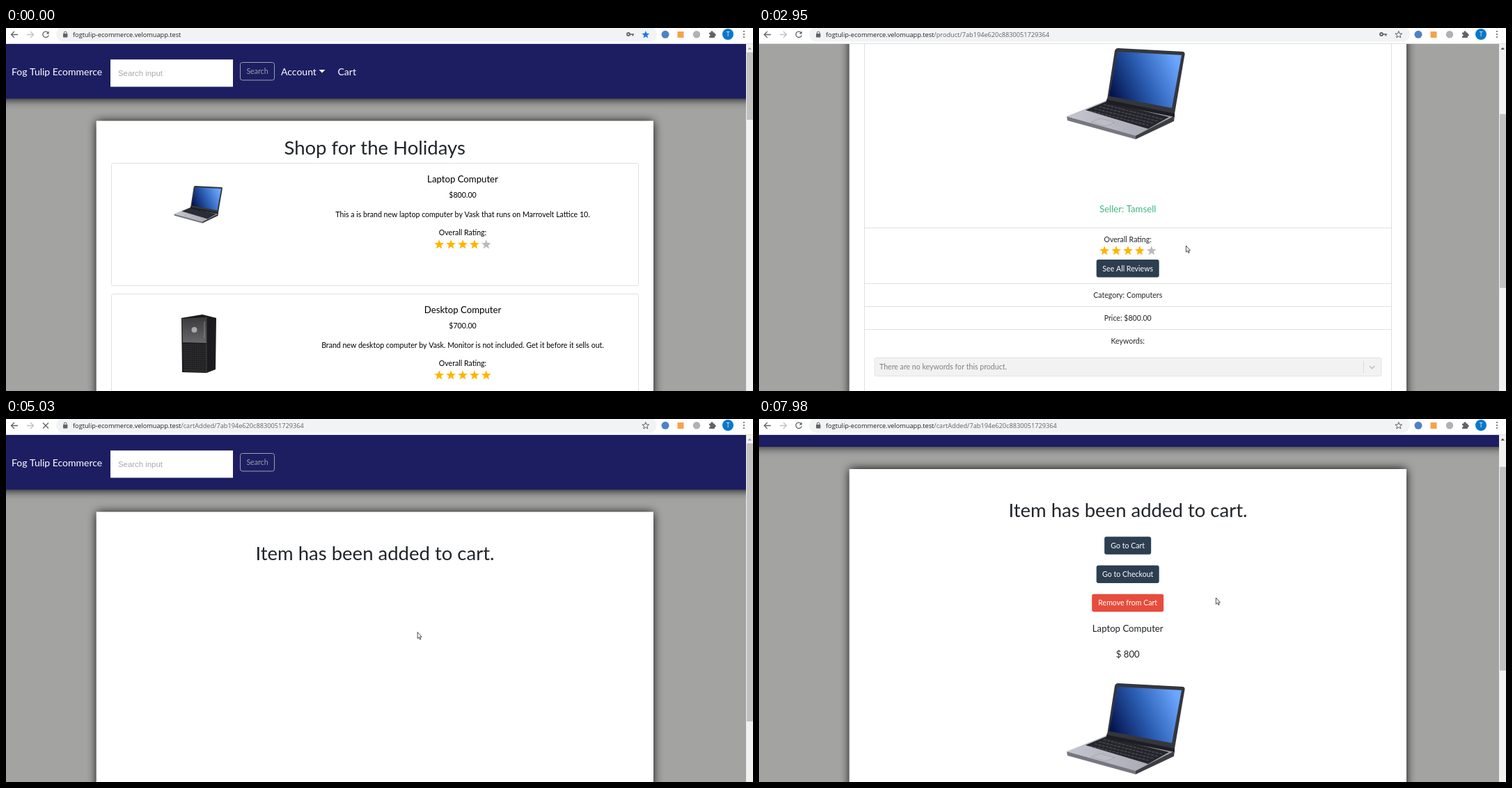
An HTML page with a canvas that plays this animation: 1073 by 522 pixels, repeating every 8 s.

```html
<!DOCTYPE html>
<html lang="en">
<head>
<meta charset="utf-8">
<title>Shop walkthrough</title>
<style>
  html, body { margin: 0; width: 100%; height: 100%; overflow: hidden; background: #fff; }
  canvas { display: block; }
</style>
</head>
<body>
<canvas id="stage" width="1073" height="522"></canvas>
<script>
const ctx = document.getElementById('stage').getContext('2d');
const LOOP = 8000, STEP = 73;
const OPEN_PRODUCT = 1690, OPEN_CART = 4480, CART_READY = 5480, LOADED = 6360;
const LATO = 'Lato, sans-serif', SANS = '"Liberation Sans", Arial, sans-serif';
const UI = '"Open Sans", sans-serif', MONO = '"Liberation Mono", monospace';
const INK = '#212529', NAVY = '#2c3e50', LINE = '#dfdfdf', HOVER = '#0f7864';
const MID = 529.7, HEADING = 27.5;
const LAPTOP_TEXT = 'This a is brand new laptop computer by Vask that runs on Marrovelt Lattice 10.';
const TOWER_TEXT = 'Brand new desktop computer by Vask. Monitor is not included. Get it before it sells out.';
const ITEM_ID = '7ab194e620c8830051729364';

const CURSOR = [
  [0, 1046, 520], [70, 1042, 496], [290, 1008, 361], [697, 1008, 361], [1170, 598, 311],
  [1539, 598, 311], [1540, 590, 316], [1690, 590, 316], [2100, 594, 319.5], [2657, 594, 319.5],
  [2950, 613, 313], [3497, 613, 313], [3890, 603, 359], [4350, 536, 366], [4550, 536, 366],
  [5190, 616, 279], [5250, 622, 272], [5887, 622, 272], [6110, 656, 257]
];
const SCROLL = [
  [0, 0], [2657, 0], [2950, 190], [3170, 310], [3420, 349], [3497, 349], [3890, 418.3],
  [4479, 418.3], [OPEN_CART, 0], [7137, 0], [7440, 105.5], [7600, 140], [7757, 140], [7980, 61.5]
];

function track(keys, t) {
  const next = keys.findIndex(k => k[0] > t);
  if (next < 0) return keys[keys.length - 1].slice(1);
  const [a, ...from] = keys[next - 1], [b, ...to] = keys[next];
  const p = Math.floor((t - a) / STEP) * STEP / (b - a);
  return from.map((v, i) => v + (to[i] - v) * p);
}

function text(str, x, y, size, color = INK, align = 'center', family = LATO) {
  ctx.font = `${size}px ${family}`;
  ctx.textAlign = align;
  ctx.fillStyle = color;
  ctx.fillText(str, x, y + size * 0.36);
  return ctx.measureText(str).width;
}

function rect(x, y, w, h, color) {
  ctx.fillStyle = color;
  ctx.fillRect(x, y, w, h);
}

function box(x, y, w, h, fill, stroke, radius = 3) {
  ctx.beginPath();
  ctx.roundRect(x, y, w, h, radius);
  if (fill) { ctx.fillStyle = fill; ctx.fill(); }
  if (stroke) { ctx.strokeStyle = stroke; ctx.lineWidth = 1; ctx.stroke(); }
}

function shape(d, fill, stroke, width = 1) {
  const path = new Path2D(d);
  if (fill) { ctx.fillStyle = fill; ctx.fill(path); }
  if (stroke) { ctx.strokeStyle = stroke; ctx.lineWidth = width; ctx.stroke(path); }
}

function gradient(x0, y0, x1, y1, ...colors) {
  const g = ctx.createLinearGradient(x0, y0, x1, y1);
  colors.forEach((c, i) => g.addColorStop(i / (colors.length - 1), c));
  return g;
}

function disc(x, y, r, color) {
  ctx.beginPath();
  ctx.arc(x, y, r, 0, Math.PI * 2);
  ctx.fillStyle = color;
  ctx.fill();
}

function shadowed(x, y, w, h, color) {
  ctx.save();
  ctx.shadowColor = '#000';
  ctx.shadowBlur = 13;
  rect(x, y, w, h, color);
  ctx.restore();
}

function at(x, y, scale, draw) {
  ctx.save();
  ctx.translate(x, y);
  ctx.scale(scale, scale);
  draw();
  ctx.restore();
}

function star(x, y, r, fill, stroke) {
  ctx.beginPath();
  for (let i = 0; i < 10; i++) {
    const a = i * Math.PI / 5 - Math.PI / 2, d = i % 2 ? r * 0.42 : r;
    ctx.lineTo(x + d * Math.cos(a), y + d * Math.sin(a));
  }
  ctx.closePath();
  if (fill) { ctx.fillStyle = fill; ctx.fill(); }
  if (stroke) { ctx.strokeStyle = stroke; ctx.lineWidth = 1; ctx.stroke(); }
}

function rating(x, y, count) {
  for (let i = 0; i < 5; i++) star(x + (i - 2) * 16.9, y + 0.5, 7.3, i < count ? '#ffb400' : '#bbb');
}

function button(label, y, w, color = NAVY) {
  box(MID - w / 2, y, w, 25.5, color);
  text(label, MID, y + 12.7, 10.6, '#fff');
}

function laptop(x, y, scale = 1) {
  at(x, y, scale, () => {
    shape('M1 98L100 125V131L2 104Z', '#77777f');
    shape('M100 125L156 97L155 105L100 131Z', '#3d3d44');
    shape('M1 98L58 75L156 97L100 126Z', gradient(0, 100, 150, 100, '#c6c6d0', '#a3a3ad'));
    shape('M28 89L57 77L148 99L118 116Z', '#25262c');
    ctx.setLineDash([4, 1.5]);
    for (let i = 0; i < 4; i++) {
      const dx = i * 6.5, dy = i * 3;
      shape(`M${54 - dx} ${81 + dy}L${138 - dx} ${102 + dy}`, null, '#4d4e57', 1.2);
    }
    ctx.setLineDash([]);
    shape('M36 106L50 101L70 107L57 112Z', '#bdbdc6', '#9a9aa3', 0.6);
    shape('M59 72L156 91L156 99L57 79Z', '#1d1e23');
    shape('M75 0L168 5Q172 6 170 12L156 94L59 74L70 4Q71 0 75 0Z', '#35363c');
    shape('M74 5L166 10L152 86L62 69Z', gradient(64, 64, 160, 20, '#04134c', '#2b5fb4', '#6ca6ff'));
  });
}

function tower(x, y) {
  at(x, y, 1, () => {
    shape('M0 5L30 0L50 5L49 79L36 84L1 83Z', '#1b1b1d');
    shape('M1 6L36 4V41L2 40Z', gradient(0, 5, 0, 42, '#3b3b3e', '#69696c'));
    shape('M2 42L36 43V83L3 82Z', '#2a2a2c');
    ctx.setLineDash([1.5, 1.5]);
    for (let i = 0; i < 12; i++) shape(`M3 ${44.5 + i * 3}L36 ${45.5 + i * 3}`, null, '#111', 1);
    ctx.setLineDash([]);
    shape('M36 3V84', null, '#4a4a4d', 0.8);
    shape('M33 10V34', null, '#99999c', 0.8);
    disc(18.5, 22, 4, '#a9a9ac');
  });
}

function productCard(y, title, price, description, stars, hovered) {
  box(151.5, y + 0.5, 757, 176, '#fff', LINE);
  const color = hovered ? HOVER : '#000';
  const lines = [[title, 23, 13.2], [price, 46.5, 10.6], [description, 74, 10.6], ['Overall Rating:', 100.5, 10.6]];
  for (const [str, dy, size] of lines) {
    const w = text(str, 656, y + dy, size, color);
    if (hovered) rect(656 - w / 2, y + dy + size * 0.36 + 1.2, w, 0.8, color);
  }
  rating(656, y + 117, stars);
}

function homePage(hovered) {
  text('Shop for the Holidays', MID, 172, HEADING);
  productCard(194, 'Laptop Computer', '$800.00', LAPTOP_TEXT, 4, hovered);
  laptop(241, 227, 0.41);
  productCard(382, 'Desktop Computer', '$700.00', TOWER_TEXT, 5, false);
  tower(252, 412);
}

function productPage(hovered) {
  box(151.5, 154.5, 757, 697, '#fff', LINE);
  text('Laptop Computer', MID, 187, HEADING);
  laptop(441, 219);
  text('Seller: Tamsell', MID, 450, 13.2, '#3fb57c');
  text('Overall Rating:', MID, 494, 10.6);
  rating(530, 510, 4);
  button('See All Reviews', 523, 90);
  text('Category: Computers', MID, 574, 10.6);
  text('Price: $800.00', MID, 607, 10.6);
  text('Keywords:', MID, 640, 10.6);
  for (const y of [477, 557, 590, 623, 714]) rect(152, y, 757, 1, LINE);
  box(166, 664, 728, 26.5, '#f2f2f2', '#e4e4e4');
  text('There are no keywords for this product.', 173, 677.5, 10.6, '#808080', 'left');
  rect(868, 669, 0.8, 17, '#d5d5d5');
  shape('M877 676L880.7 679.7L884.4 676', null, '#bdbdbd', 1.5);
  text(LAPTOP_TEXT, 527, 736, 8.4, INK, 'center', MONO);
  button('Add to Cart', 770.3, 71.5, hovered ? '#1e2b37' : NAVY);
  button('Add to Wishlist', 812, 89.5);
  button('Go Back', 883.3, 57);
}

function cartPage(ready) {
  text('Item has been added to cart.', 530, 193, HEADING);
  if (!ready) return;
  button('Go to Cart', 230.7, 67);
  button('Go to Checkout', 272, 90);
  button('Remove from Cart', 313.2, 103, '#e74c3c');
  text('Laptop Computer', MID, 362.5, 13.2);
  text('$ 800', MID, 399.5, 13.2);
  laptop(441, 441.5);
}

function navbar(showMenu) {
  shadowed(-20, 0, 1100, 101.5, '#1d1d62');
  text('Fog Tulip Ecommerce', 8, 62.5, 14, '#fff', 'left');
  rect(150, 45.3, 176, 39.2, '#fff');
  text('Search input', 161, 65, 11.4, '#a9a9a9', 'left', SANS);
  box(336.5, 49.5, 49, 25.5, null, '#95a5a6');
  text('Search', 361, 62.3, 10.6, '#95a5a6');
  if (!showMenu) return;
  text('Account', 395, 62.5, 14, '#fff', 'left');
  shape('M449.5 60H458.5L454 64.5Z', '#fff');
  text('Cart', 476.5, 62.5, 14, '#fff', 'left');
}

function scrollbar(top, height) {
  rect(1063, 23, 10, 499, '#f1f1f1');
  shape('M1065.5 31H1071L1068.2 27.8Z', top > 0 ? '#505050' : '#a3a3a3');
  rect(1064, 35 + top, 9, height, '#c1c1c1');
}

function browserBar(path, saved, hasKey, loading) {
  const grey = '#5f6368';
  rect(0, 0, 1073, 23, '#fff');
  rect(0, 22, 1073, 1, '#dcdfe2');
  box(72, -1, 863, 20.5, '#f1f3f4', null, 10);
  shape('M17 9.5H7.5M12 5L7.5 9.5L12 14', null, grey, 1.3);
  shape('M30 9.5H39.5M35 5L39.5 9.5L35 14', null, '#bdc1c6', 1.3);
  if (loading) {
    shape('M53 5.5L61 13.5M61 5.5L53 13.5', null, grey, 1.3);
  } else {
    shape('M60.3 6.5A4.2 4.2 0 1 0 61.2 10.3', null, grey, 1.3);
    shape('M61.7 4.5V8.6H57.6Z', grey);
  }
  box(82, 8, 6.4, 5.5, grey, null, 0.8);
  shape('M83.3 8.2V7A1.9 1.9 0 0 1 87.1 7V8.2', null, grey, 1);
  const w = text('fogtulip-ecommerce.velomuapp.test', 96, 9.3, 9.2, '#202124', 'left', UI);
  text(path, 96 + w, 9.3, 9.2, grey, 'left', UI);
  if (hasKey) {
    disc(894, 9, 2.9, grey);
    disc(894, 9, 1.1, '#f1f3f4');
    shape('M896 9H902M900.3 9V11.5', null, grey, 1.7);
  }
  star(918.8, 9.7, saved ? 5.8 : 5.2, saved && '#1a73e8', !saved && grey);
  disc(947, 9.3, 5.5, '#4c83c3');
  box(964.5, 5, 9, 9, '#f6a24b', null, 0);
  disc(992, 9.3, 5.2, '#aeb1b5');
  box(1010, 6.5, 8, 7.5, grey, null, 1);
  disc(1014, 6, 1.8, grey);
  disc(1018, 10, 1.8, grey);
  disc(1010.2, 10.4, 1.3, '#fff');
  disc(1037, 9, 8, '#0b78c8');
  text('T', 1037, 9, 8.5, '#fff', 'center', UI);
  for (const y of [5, 9, 13]) disc(1060, y, 1.1, grey);
}

function pointer(x, y, hand) {
  at(x, y, 1, () => hand
    ? shape('M-1 .5Q0-.5 1 .5V4.5L4.5 5.5Q5 6 5 7V9L4 11.5H-1.5L-4 7.5Q-4 6-2.5 6.5L-1 8Z', '#fff', '#222', 0.8)
    : shape('M.4 0V9.2L2.4 7.4L3.8 10.6L5.2 10L3.8 6.9H6.4Z', '#fff', '#222', 0.8));
}

function draw(t) {
  const page = t < OPEN_PRODUCT ? 'home' : t < OPEN_CART ? 'product' : 'cart';
  const ready = t >= CART_READY;
  const [scroll] = track(SCROLL, t), [x, y] = track(CURSOR, t);
  const hand = page === 'home' ? x < 909 : page === 'product' && t > 3900 && x < 565;

  ctx.save();
  ctx.beginPath();
  ctx.rect(0, 23, 1073, 499);
  ctx.clip();
  rect(0, 0, 1073, 522, '#a3a3a2');
  ctx.translate(0, -scroll);
  shadowed(129.7, 133.5, 800.3, 1000, '#fff');
  navbar(page !== 'cart' || ready);
  if (page === 'home') homePage(hand);
  else if (page === 'product') productPage(hand);
  else cartPage(ready);
  ctx.restore();

  if (page === 'home') scrollbar(0, 97);
  else if (page === 'product') scrollbar(scroll * 0.467, 250);
  else scrollbar(scroll * 0.55, ready ? 293 : 400);

  const path = { home: '', product: '/product/' + ITEM_ID, cart: '/cartAdded/' + ITEM_ID }[page];
  browserBar(path, page === 'home', page !== 'cart', page === 'cart' && t < LOADED);
  if (t >= 70) pointer(x, y, hand);
}

const start = performance.now();
function frame() {
  draw((performance.now() - start) % LOOP);
  requestAnimationFrame(frame);
}
frame();
</script>
</body>
</html>
```
